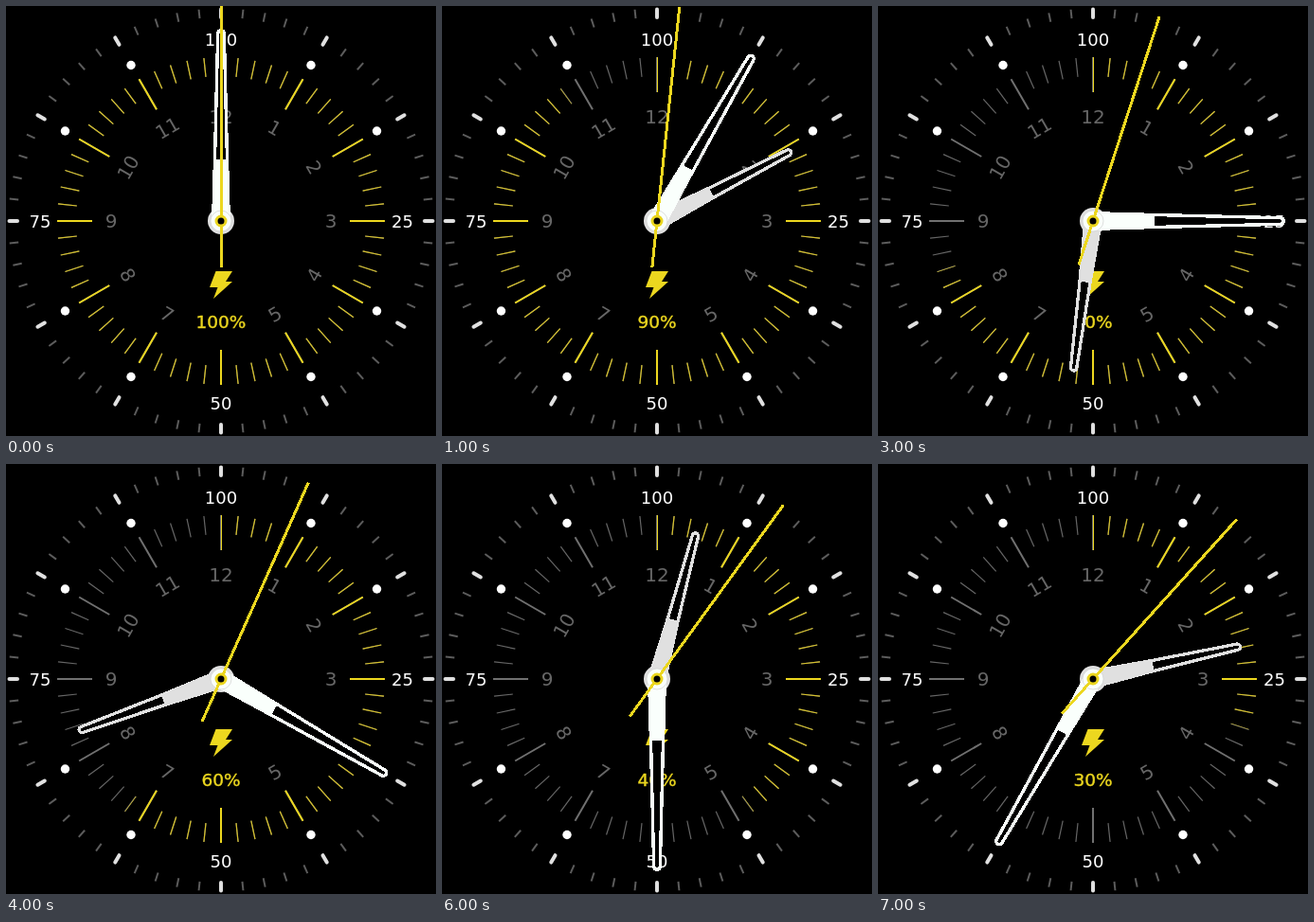
An HTML page that plays this animation: 454 px wide and 454 px high, repeating every 8 s.

```html
<!DOCTYPE html>
<html lang="en">
<head>
<meta charset="utf-8">
<title>Watch face</title>
<style>
  html, body { margin: 0; width: 100%; height: 100%; overflow: hidden; background: #000; }
  svg { display: block; width: 100vw; height: 100vh; }
  text { font-family: "DejaVu Sans", sans-serif; text-anchor: middle; }
</style>
</head>
<body>
<svg id="face" viewBox="-227 -227 454 454"></svg>
<script>
const STEP = 1000, STEPS = 8;
const YELLOW = '#ecd71f', GREY = '#666', WHITE = '#fafffc', SILVER = '#e0e0e0';
const face = document.getElementById('face');

function add(tag, attrs, parent = face) {
  const el = document.createElementNS('http://www.w3.org/2000/svg', tag);
  for (const key in attrs) el.setAttribute(key, attrs[key]);
  parent.appendChild(el);
  return el;
}

function tick(angle, inner, outer, width, stroke, parent = face, cap = 'butt') {
  return add('line', {
    x1: 0, x2: 0, y1: -inner, y2: -outer, stroke,
    'stroke-width': width, 'stroke-linecap': cap, transform: `rotate(${angle})`
  }, parent);
}

function label(str, x, y, size, fill, turn = 0) {
  const el = add('text', {
    y: size * 0.365, 'font-size': size, fill,
    transform: `translate(${x} ${y}) rotate(${turn})`
  });
  el.textContent = str;
  return el;
}

function polar(angle, r) {
  const a = angle * Math.PI / 180;
  return [r * Math.sin(a), -r * Math.cos(a)];
}

// Solid near the hub, hollow from r = 65 to the tip
function hand(length, base, mid, tip, edge, fill) {
  const g = add('g', { 'shape-rendering': 'crispEdges' });
  const end = length - tip;
  add('path', {
    d: `M${-base} 0L${-mid} -65L${-tip} ${-end}A${tip} ${tip} 0 0 1 ${tip} ${-end}L${mid} -65L${base} 0Z`, fill
  }, g);
  const a = mid - edge, b = tip - edge;
  add('path', {
    d: `M${-a} -65L${-b} ${-end}A${b} ${b} 0 0 1 ${b} ${-end}L${a} -65Z`, fill: '#000'
  }, g);
  return g;
}

// Dial
const sector = add('polygon', {}, add('clipPath', { id: 'charge' }));
const idle = add('g', {});
const lit = add('g', { 'clip-path': 'url(#charge)' });

for (let a = 0; a < 360; a += 6) {
  const major = a % 30 === 0;
  const inner = major ? 136 : 153, width = major ? 2 : 1.2;
  tick(a, inner, 173, width, major ? '#707070' : GREY, idle);
  tick(a, inner, 173, width, major ? YELLOW : '#d6c128', lit);

  if (major) tick(a, 215, 223.5, 4, SILVER, face, 'round');
  else tick(a, 215, 224.5, 2, '#5c5c5c');

  if (major && a % 90) {
    const [cx, cy] = polar(a, 190);
    add('circle', { cx, cy, r: 4.7, fill: '#fff' });
  }
}

label('100', 0, -192, 18, '#fff');
label('25', 191.5, 0, 18, '#fff');
label('50', 0, 192, 18, '#fff');
label('75', -191, 0, 18, '#fff');

for (let h = 1; h <= 12; h++) {
  if (h === 6) continue;
  const angle = h * 30;
  const [x, y] = polar(angle, h === 12 ? 110 : h % 3 ? 113.5 : 116);
  const turn = h % 3 === 0 ? 0 : h > 3 && h < 9 ? angle - 180 : angle;
  label(h, x, y, 20, GREY, turn);
}

// Battery
add('polygon', { points: '-5.5,53 12,53 5,64 12,64 -8,82 -3.5,70 -12,70', fill: YELLOW });
const percent = label('', 0, 106, 18.5, YELLOW);
percent.setAttribute('stroke', YELLOW);
percent.setAttribute('stroke-width', 0.4);

// Hands
const hour = hand(161, 10, 7.2, 4.8, 3.3, SILVER);
add('circle', { r: 14, fill: SILVER });
const minute = hand(203, 10, 8.2, 5, 3.4, WHITE);
add('circle', { r: 11, fill: WHITE, stroke: '#c8c8c8', 'stroke-width': 0.6 });
const second = tick(0, -49, 227, 3, YELLOW);
second.setAttribute('shape-rendering', 'crispEdges');
add('circle', { r: 5, fill: '#000', stroke: YELLOW, 'stroke-width': 3 });

const turn = (el, angle) => el.setAttribute('transform', `rotate(${angle})`);

// Pie slice from 12 o'clock, clockwise
function slice(sweep) {
  const points = ['0,0'];
  for (let a = 0; a <= sweep; a += 6) points.push(polar(a, 200).join());
  return points.join(' ');
}

let shown = -1;
function draw(now) {
  const n = Math.floor(now / STEP) % STEPS;
  if (n === shown) return;
  shown = n;
  turn(hour, n * 62.5);
  turn(minute, n * 30);
  turn(second, n * 6);
  percent.textContent = 100 - n * 10 + '%';
  sector.setAttribute('points', slice(360 - n * 36));
}

const start = performance.now();
function loop() {
  draw(performance.now() - start);
  requestAnimationFrame(loop);
}
loop();
</script>
</body>
</html>
```
